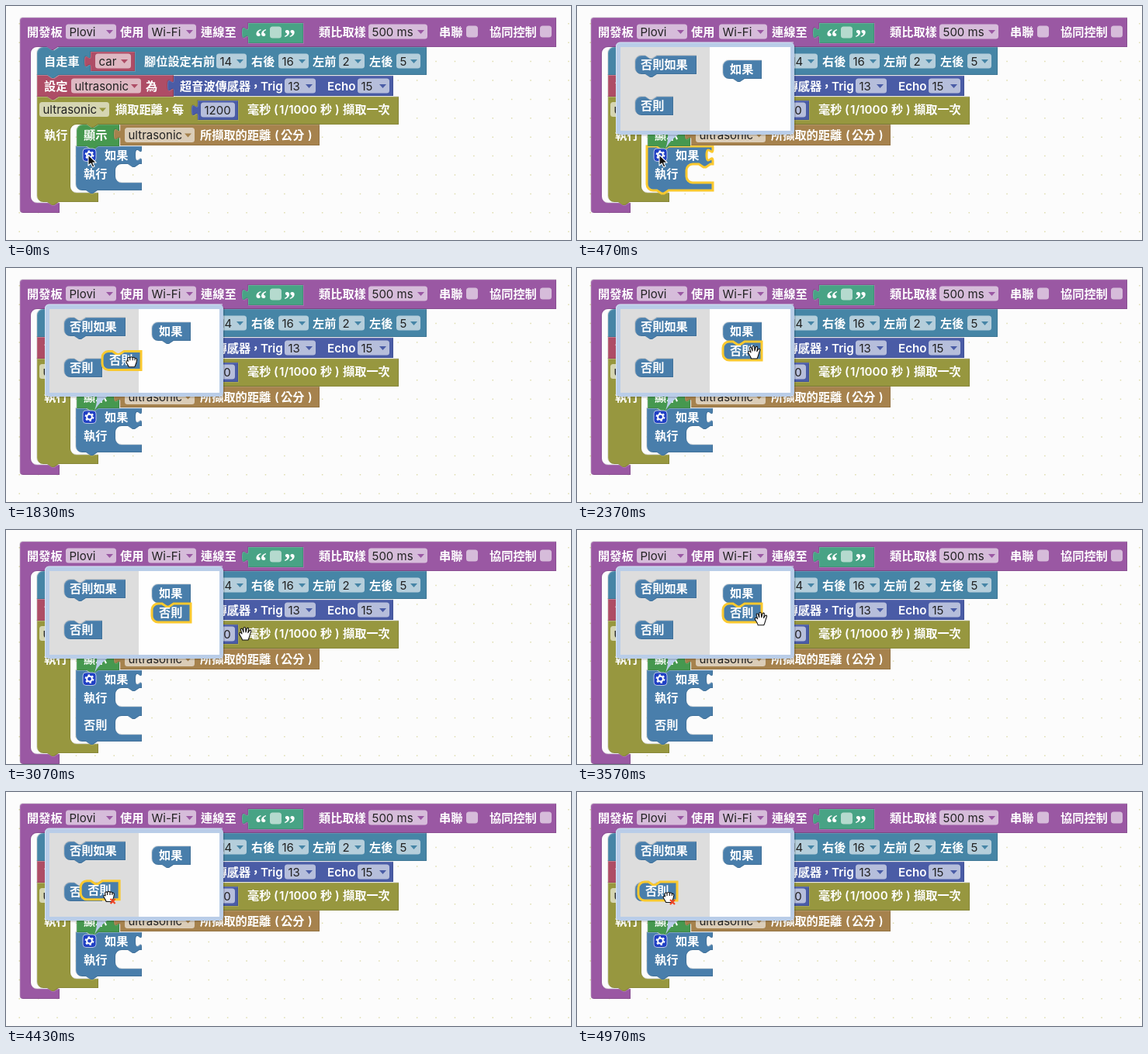
Recreate the animation shown at these times as an HTML page. Size 728 px wide and 302 px high, loop 5.01 s.

```html
<!DOCTYPE html>
<html lang="zh-Hant">
<head>
<meta charset="utf-8">
<style>
html, body { margin: 0; width: 100%; height: 100%; overflow: hidden; background: #fcfcfc; }
svg { display: block; width: 728px; height: 302px; }
text { font: 600 15.2px Inter, "Noto Sans CJK TC", "Noto Sans CJK", sans-serif; fill: #fff; }
.field { font-weight: 400; font-size: 15px; fill: #222; }
.quote { font: 700 30px "Liberation Serif", serif; }
</style>
</head>
<body>
<svg id="stage" viewBox="0 0 728 302"></svg>
<script>
const LOOP = 5010, GROW = 35;
const color = {
  board: '#9a58a3', car: '#4685a6', variable: '#ae4d66', sensor: '#4a5ca6',
  loop: '#97973f', show: '#46984f', reading: '#a6824d', text: '#48a385', logic: '#497eab'
};
const GOLD = '#fbc92f';

// Path pieces shared by all blocks
const NOTCH = 'l6 4 3 0 6 -4', BUMP = 'l-6 4 -3 0 -6 -4';
const SOCKET = 'c0 10 -8 -8 -8 7.5 s8 -2.5 8 7.5';
const SLOT = `H172 ${BUMP} h-8 a8 8 0 0 0 -8 8 v8 a8 8 0 0 0 8 8 H175`;
const INNER_TOP = 'h-8 a8 8 0 0 0 -8 8', INNER_BOTTOM = 'a8 8 0 0 0 8 8';
const OUTER_TOP = 'a8 8 0 0 1 8 -8', OUTER_BOTTOM = 'a8 8 0 0 1 -8 -8';

const block = (d, fill, id = '') => `<g ${id && `id="${id}"`}>
  <path d="${d}" fill="${fill}"/>
  <path d="${d}" fill="none" stroke="#000" stroke-opacity=".1" transform="translate(-.5 -.5)"/>
  <path d="${d}" fill="none" stroke="#fff" stroke-opacity=".14" transform="translate(.5 .5)"/></g>`;

// Left corners are round where a stack starts or ends
function statement(x, y, w, h, { top = true, bottom = true, first = false, last = false } = {}) {
  return `M${x} ${first ? `${y + 8} ${OUTER_TOP}` : y} H${x + 13} ${top ? NOTCH : ''} H${x + w} v${h}
    H${x + 28} ${bottom ? BUMP : ''} ${last ? `H${x + 8} ${OUTER_BOTTOM}` : `H${x}`} Z`;
}

const value = (x, y, w, h) =>
  `M${x} ${y} h${w} v${h} h${-w} V${y + 20} c0 -10 -8 8 -8 -7.5 s8 2.5 8 -7.5 Z`;

const label = (x, y, s) => `<text x="${x}" y="${y + 5.5}">${s}</text>`;
const box = (x, y, w, h) =>
  `<rect x="${x}" y="${y - h / 2}" width="${w}" height="${h}" rx="3.5" fill="#fff" fill-opacity=".6"/>`;
const field = (x, y, w, s) => box(x, y, w, 19) +
  `<text class="field" x="${x + 4.5}" y="${y + 5.5}">${s}</text>`;
const menu = (x, y, w, s, fill) => field(x, y, w, s) +
  `<path d="M${x + w - 13} ${y - 2} h9 l-4.5 5 Z" fill="${fill}"/>`;

const boardPath = g => `M18 19 a4 4 0 0 1 4 -4 H709 V53 H67 ${BUMP} H48 ${INNER_TOP} V${246 + g} ${INNER_BOTTOM}
  H69 V${267 + g} H22 a4 4 0 0 1 -4 -4 Z`;
const loopPath = g => `M40 117 h13 ${NOTCH} H506 V153 H119 ${BUMP} H99 ${INNER_TOP} V${233 + g} ${INNER_BOTTOM}
  H119 V${253 + g} H68 ${BUMP} H48 ${OUTER_BOTTOM} Z`;
const ifPath = g => `M90 181 h13 ${NOTCH} H175 V185 ${SOCKET} V204 ${SLOT}
  ${g ? `V240 ${SLOT}` : ''} V${238 + g} H118 ${BUMP} H98 ${OUTER_BOTTOM} Z`;

function grid() {
  let dots = '';
  for (let y = 22.8; y < 302; y += 24.4)
    for (let x = 16.5; x < 728; x += 24.4) dots += `M${x.toFixed(1)} ${y.toFixed(1)} h1.5 `;
  return `<path d="${dots}" stroke="#dedcae" stroke-width="1.5"/>`;
}

function boardRow() {
  return label(27, 33, '開發板') + menu(77, 33, 65, 'Plovi', color.board) +
    label(147, 33, '使用') + menu(183, 33, 62, 'Wi-Fi', color.board) + label(251, 33, '連線至') +
    block(value(312, 22, 71, 26), color.text) + box(340, 34, 15, 15) +
    '<text class="quote" x="321" y="50">“</text><text class="quote" x="358" y="50">”</text>' +
    label(403, 33, '類比取樣') + menu(467, 33, 76, '500 ms', color.board) +
    label(558, 33, '串聯') + box(593, 33, 15, 15) + label(623, 33, '協同控制') + box(688, 33, 15, 15);
}

function carRow() {
  return block(statement(40, 53, 502, 36, { first: true }), color.car) + label(49, 71, '自走車') +
    block(value(109, 59, 57, 25), color.variable) + menu(115, 71, 46, 'car', color.variable) +
    label(178, 71, '腳位設定右前') + menu(271, 71, 39, '14', color.car) +
    label(316, 71, '右後') + menu(351, 71, 39, '16', color.car) +
    label(395, 71, '左前') + menu(429, 71, 33, '2', color.car) +
    label(468, 71, '左後') + menu(503, 71, 31, '5', color.car);
}

function sensorRow() {
  return block(statement(40, 89, 176, 28), color.variable) + label(49, 103, '設定') +
    menu(84, 103, 90, 'ultrasonic', color.variable) + label(180, 103, '為') +
    block(value(216, 90, 283, 26), color.sensor) + label(224, 103, '超音波傳感器') +
    label(314, 103, '，') + label(328, 103, 'Trig') + menu(359, 103, 40, '13', color.sensor) +
    label(414, 103, 'Echo') + menu(453, 103, 41, '15', color.sensor);
}

function loopRow() {
  return menu(43, 133.5, 90, 'ultrasonic', color.loop) + label(141, 133.5, '擷取距離') +
    label(200, 133.5, '，') + label(214, 133.5, '每') +
    block(value(247, 122, 52, 25), color.sensor) + field(251, 134, 44, '1200') +
    label(311, 133.5, '毫秒') + label(345, 133.5, '(') + label(352, 133.5, '1/1000') +
    label(405, 133.5, '秒') + label(424, 133.5, ')') + label(434, 133.5, '擷取一次') +
    label(49, 166, '執行');
}

function showRow() {
  return block(statement(91, 153, 55, 28, { first: true }), color.show) + label(100, 166.5, '顯示') +
    block(value(147, 153, 257, 27), color.reading) + menu(153, 166.5, 90, 'ultrasonic', color.reading) +
    label(250, 166.5, '所擷取的距離') + label(346, 166.5, '(') +
    label(354, 166.5, '公分') + label(389, 166.5, ')');
}

const gear = `<rect x="99" y="184" width="17" height="16.5" rx="4" fill="#1f3fc4" stroke="#b9c6e4"/>
  <g fill="none" stroke="#fff"><circle cx="107.5" cy="192.2" r="3.4" stroke-width="2"/>
  <circle cx="107.5" cy="192.2" r="5" stroke-width="1.8" stroke-dasharray="2.4 2.836"/></g>`;

const ends = { first: true, last: true };
const piecePath = statement(0, 0, 50, 24, { bottom: false, ...ends });
const popup = `<g id="popup">
  <path d="M117 164 H133 Q121 172 114 184 Q118 173 117 164 Z" fill="#b9cde8"/>
  <rect x="52" y="49" width="230" height="119" rx="5" fill="#000" opacity=".12"/>
  <rect x="50" y="47" width="230" height="119" rx="5" fill="#b9cde8"/>
  <path d="M50.5 165 V52 a5 5 0 0 1 5 -5 H279" fill="none" stroke="#d8e4f4"/>
  <rect x="56" y="53" width="219" height="108" fill="#fefefe"/>
  <rect x="56" y="53" width="115" height="108" fill="#ddd"/>
  ${block(statement(75, 64, 79, 24, ends), color.logic)}${label(82, 75.5, '否則如果')}
  ${block(statement(75, 117, 49, 24, { bottom: false, ...ends }), color.logic)}${label(82, 128.5, '否則')}
  ${block(statement(188, 70, 50, 24, { top: false, ...ends }), color.logic)}${label(197, 81.5, '如果')}
  <g id="piece">${block(piecePath, color.logic)}
    <path d="${piecePath}" fill="none" stroke="${GOLD}" stroke-width="3"/>
    ${label(9, 11.5, '否則')}</g></g>`;

const cursors = `<g id="cursor" stroke="#111" stroke-width="1.1" stroke-linejoin="round">
  <path id="arrow" d="M0 0 V14 L3.3 11 5.6 16 8 15 5.8 10.2 H10.2 Z" fill="#111" stroke="#fff"/>
  <path id="open" fill="#fff" d="M-3.5 8 C-4 5 -7 2 -7.5 0 C-7.5 -2 -5.5 -2 -4 0 L-5.5 -5 C-6 -7 -3.8 -7.6 -3.2 -5.6
    L-2 -2 -2 -7 C-2 -9 .5 -9 .6 -7 L1 -2 2.2 -6.5 C2.8 -8.4 5 -7.8 4.6 -6 L3.8 -1.4 5.6 -4
    C6.8 -5.6 8.4 -4.2 7.6 -2.6 C6 1 6 4 4 8 Z"/>
  <path id="closed" fill="#fff" d="M-3.5 7.5 C-4 5 -6.5 3 -6.8 1 C-7 -1 -5 -1 -4.5 0 L-5 -3 C-5 -5.4 -2.6 -5.6 -2 -4
    C-1.6 -6 1 -6 1.4 -4.2 C2 -5.6 4.2 -5.2 4.3 -3.4 C5.4 -4.4 7 -3.4 6.8 -1.6 C6.6 2 5.6 4 4 7.5 Z
    M-2 -4 V-1 M1.4 -4 V-1 M4.3 -3.2 V-1"/>
  <path id="cross" fill="none" stroke="#ee4526" stroke-width="2.2" d="M2 4 l6 6 m0 -6 l-6 6"/></g>`;

const stage = document.getElementById('stage');
stage.innerHTML = grid() + block(boardPath(0), color.board, 'board') +
  block(loopPath(0), color.loop, 'loop') + boardRow() + sensorRow() + carRow() + loopRow() +
  block(ifPath(0), color.logic, 'branch') +
  `<path id="halo" d="${ifPath(0)}" fill="none" stroke="${GOLD}" stroke-width="3"/>` + showRow() +
  gear + label(127, 192, '如果') + label(100, 216, '執行') +
  `<g id="else">${label(100, 251, '否則')}</g>` + popup + cursors;

const el = id => document.getElementById(id);
const show = (id, on) => el(id).setAttribute('display', on ? 'inline' : 'none');
const shape = (id, d) => el(id).querySelectorAll('path').forEach(p => p.setAttribute('d', d));
const during = (t, a, b) => t >= a && t < b;

// Eased position along [time, x, y] keys
function along(keys, t) {
  const i = keys.findIndex(k => k[0] > t);
  if (i === 0) return keys[0].slice(1);
  if (i < 0) return keys[keys.length - 1].slice(1);
  const [t0, x0, y0] = keys[i - 1], [t1, x1, y1] = keys[i];
  const p = (t - t0) / (t1 - t0), e = p * p * (3 - 2 * p);
  return [x0 + (x1 - x0) * e, y0 + (y1 - y0) * e];
}

const pointerKeys = [[0, 106, 192], [650, 106, 192], [1200, 111, 129], [1480, 111, 129],
  [2250, 228, 109], [2600, 228, 109], [2980, 308, 134], [3250, 308, 134], [3700, 219, 110],
  [3940, 219, 110], [4030, 187, 130], [4600, 118, 135]];
const pieceKeys = [[1480, 75, 117], [2250, 188, 95], [3940, 188, 95], [4030, 160, 110], [4600, 79, 116]];
const UNPLUG = 3974, WIGGLE = 200;

function wiggle(t) {
  const p = (t - UNPLUG) / WIGGLE;
  return p < 0 || p > 1 ? 0 : -22 * Math.sin(p * Math.PI * 3) * (1 - p);
}

let grown;
function resize(g) {
  if (g === grown) return;
  grown = g;
  shape('board', boardPath(g));
  shape('loop', loopPath(g));
  shape('branch', ifPath(g));
  show('else', g > 0);
}

function draw(t) {
  resize(during(t, 2450, UNPLUG) ? GROW : 0);
  show('popup', t >= 280);
  show('halo', during(t, 200, 1500));
  show('piece', t >= 1250);
  const [px, py] = along(pieceKeys, t), [x, y] = along(pointerKeys, t);
  el('piece').setAttribute('transform', `translate(${px} ${py}) skewX(${wiggle(t)})`);
  el('cursor').setAttribute('transform', `translate(${x} ${y})`);
  const arrow = t < 1050, closed = during(t, 1480, 2300) || t >= 3900;
  show('arrow', arrow);
  show('closed', closed);
  show('open', !arrow && !closed);
  show('cross', t > 4030 && x < 170);
}

const start = performance.now();
function tick() {
  draw((performance.now() - start) % LOOP);
  requestAnimationFrame(tick);
}
tick();
</script>
</body>
</html>
```
